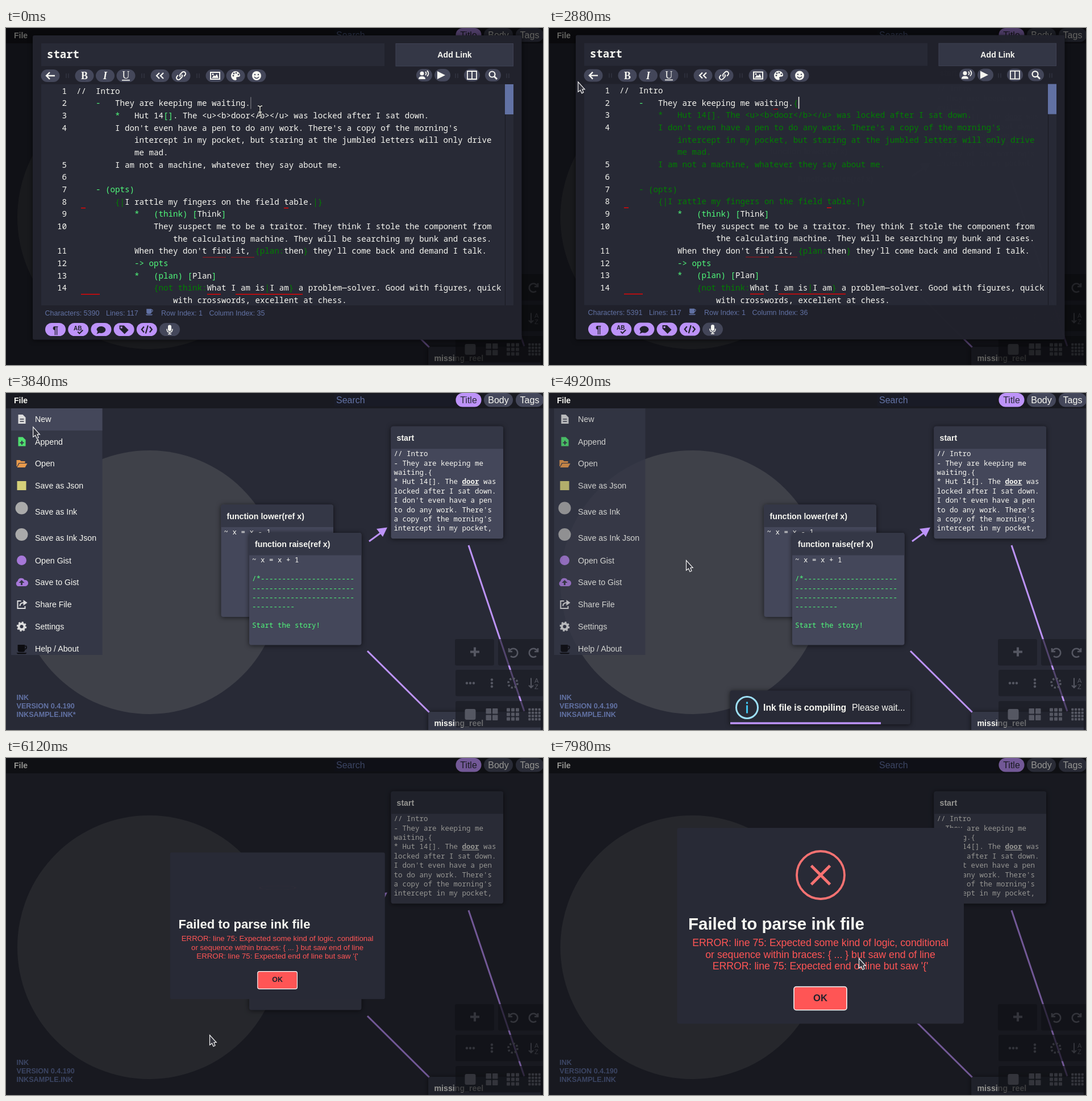
These frames come from a looping animation (945 by 593 pixels, 8000 ms). An HTML page:

```html
<!DOCTYPE html>
<html lang="en">
<head>
<meta charset="utf-8">
<title>Story editor</title>
<style>
html, body { margin: 0; width: 100%; height: 100%; overflow: hidden; background: #282a36; }
svg { display: block; width: 100vw; height: 100vh; }
text { white-space: pre; fill: #f8f8f2; font-family: "Liberation Sans", Arial, sans-serif; }
.mono { font-family: "Noto Sans Mono", monospace; }
.b { font-weight: 700; }
.g { fill: #50fa7b; }
.d, .open text, .open tspan { fill: #008000; }
.shade { filter: drop-shadow(0 1px 4px rgba(0,0,0,.6)); }
</style>
</head>
<body>
<svg id="stage" viewBox="0 0 945 593"></svg>
<script>
const FG = '#f8f8f2', BG = '#282a36', LINE = '#44475a', HEAD = '#343746',
      BLUE = '#6272a4', PURPLE = '#bd93f9', RED = '#ff5555', DARK = '#21222c';
const esc = s => s.replace(/&/g, '&amp;').replace(/</g, '&lt;');
const rect = (x, y, w, h, fill, r = 0, more = '') =>
  `<rect x="${x}" y="${y}" width="${w}" height="${h}" rx="${r}" fill="${fill}" ${more}/>`;
const circle = (x, y, r, fill, more = '') => `<circle cx="${x}" cy="${y}" r="${r}" fill="${fill}" ${more}/>`;
const text = (x, y, size, s, more = '') => `<text x="${x}" y="${y}" font-size="${size}" ${more}>${esc(s)}</text>`;
const fill = (d, c = FG) => `<path d="${d}" fill="${c}" fill-rule="evenodd"/>`;
const line = (d, c = FG, w = 2) => `<path d="${d}" fill="none" stroke="${c}" stroke-width="${w}"/>`;
const at = (x, y, s) => `<g transform="translate(${x} ${y})">${s}</g>`;
const group = (id, s, more = '') => `<g id="${id}" ${more}>${s}</g>`;
const mid = c => `text-anchor="middle" style="fill:${c}"`;
const grid = (n, size, gap, c) => {
  let s = '', o = -(n * size + (n - 1) * gap) / 2;
  for (let i = 0; i < n * n; i++)
    s += rect(o + (i % n) * (size + gap), o + Math.floor(i / n) * (size + gap), size, size, c, n > 1 ? 1 : 3);
  return s;
};
const cup = c => fill('M-6-6H5V2Q5 5 2 5H-3Q-6 5-6 2ZM-8 6H8L6 8H-6Z', c) + line('M5-4H7Q9-1 5 1', c, 1.5);

// ---- board -------------------------------------------------------------
function card(x, y, title, rows) {
  let s = rect(x, y, 197.5, 197.5, LINE, 4) +
    `<path d="M${x} ${y + 39.5}v-35.5q0-4 4-4h189.5q4 0 4 4v35.5z" fill="${HEAD}"/>` +
    text(x + 10, y + 25, 14.2, title, 'class="b"');
  rows.forEach((r, i) => {
    if (r) s += `<text class="mono ${r[0] === '^' ? 'g' : ''}" x="${x + 5}" y="${y + 52.3 + i * 16.4}" font-size="12.5">` +
      esc(r.replace('^', '')).replace('door', '<tspan font-weight="700" text-decoration="underline">door</tspan>') + '</text>';
  });
  return `<g class="shade">${s}</g>`;
}

function tools() {
  const c = '#555762', box = (x, y, w) => rect(x, y, w, 46.5, '#1a1b22', 3, 'opacity=".65"');
  const turn = 'M-7-7V-1H-1M-6-2A7.5 7.5 0 1 1-4 7';
  const dots = v => [-6, 0, 6].map(i => circle(v ? 0 : i, v ? i : 0, 2.2, c)).join('');
  return box(790, 433, 69) + box(866, 433, 90) + box(791, 487, 160) + box(791, 542, 160) +
    at(825, 455.5, line('M-8 0H8M0-8V8', c, 4)) +
    at(892, 456, line(turn, c, 2.6)) + at(929, 456, `<g transform="scale(-1 1)">${line(turn, c, 2.6)}</g>`) +
    at(817, 510.5, dots(0)) + at(855, 510.5, dots(1)) +
    at(892, 510.5, circle(0, 0, 8, 'none', `stroke="${c}" stroke-width="3.6" stroke-dasharray="3.2 3.1"`)) +
    at(929, 510.5, line('M-5-9V8M-9 4L-5 8L-1 4', c, 2) + text(1, -1, 11, 'A', `style="fill:${c}"`) +
      text(1, 10, 11, 'Z', `style="fill:${c}"`)) +
    at(817, 565.5, grid(1, 19, 0, c)) + at(855, 565.5, grid(2, 9.5, 2, c)) +
    at(892, 565.5, grid(3, 6, 2, c)) + at(930, 565.5, grid(4, 4.2, 1.6, c));
}

function board() {
  const pill = (x, w, s, bg, fg) => rect(x, 0, w, 24.5, bg, 12) + text(x + w / 2, 18, 16, s, mid(fg));
  const start = ['// Intro', '- They are keeping me', 'waiting.{', '* Hut 14[]. The door was', 'locked after I sat down.',
    "I don't even have a pen", "to do any work. There's", "a copy of the morning's", 'intercept in my pocket,'];
  const dash = n => '^' + '-'.repeat(n);
  return rect(0, 0, 945, 593, BG) + circle(252, 333, 232, '#3f4149') +
    group('version', ['INK', 'VERSION 0.4.190'].map((s, i) =>
      text(18.5, 540 + i * 15.2, 12.6, s, `class="b" style="fill:${BLUE}"`)).join('') +
      text(18.5, 570.4, 12.6, '', `id="file" class="b" style="fill:${BLUE}"`)) +
    line('M639 261L661 245M636 454L745 562M814 268L912 560', PURPLE, 3) + fill('M671 236.5L663 253L652 239Z', PURPLE) +
    card(378.5, 196.5, 'function lower(ref x)', ['~ x = x - 1']) +
    card(428, 246, 'function raise(ref x)', ['~ x = x + 1', '', '^/*' + '-'.repeat(22), dash(24), dash(24), dash(10), '', '^Start the story!']) +
    card(677.5, 58.8, 'start', start) + card(743.5, 561, 'missing_reel', []) + tools() +
    rect(0, 0, 945, 27, '#191a21') + text(14, 17.5, 14, 'File', 'class="b"') +
    rect(578, 2, 209, 21.5, '#191b26') + text(581, 18, 16, 'Search', `style="fill:${BLUE}"`) +
    pill(791.5, 45, 'Title', PURPLE, BG) + pill(841, 51, 'Body', LINE, FG) + pill(897, 49, 'Tags', LINE, FG);
}

// ---- file menu ---------------------------------------------------------
function menu() {
  const page = 'M-6-8H2L7-3V8H-6Z';
  const items = [
    ['New', 46, fill(page, '#ddd') + line('M-3 0H4M-3 4H4', HEAD, 1.5)],
    ['Append', 85.5, fill(page, '#50e070') + line('M-3 2H4M.5-1.5V5.5', HEAD, 2)],
    ['Open', 124, fill('M-9-6H-3L-1-4H6V-1H-5L-8 5H-9ZM-4 0H10L6 7H-8Z', '#e89a4c')],
    ['Save as Json', 163, rect(-8, -8, 16, 16, '#d5d079')],
    ['Save as Ink', 208.5, at(0, -6, circle(0, 0, 11, '#aaa'))],
    ['Save as Ink Json', 255, at(0, -6, circle(0, 0, 11, '#aaa'))],
    ['Open Gist', 294.5, circle(0, 0, 8.5, '#a678d8')],
    ['Save to Gist', 333, fill('M-7 7A5 5 0 0 1-7-2A6.5 6.5 0 0 1 5-4A5.5 5.5 0 0 1 7 7ZM0-4L-5 1H-1.5V5H1.5V1H5Z', '#a678d8')],
    ['Share File', 372, line('M-1-6H-7V7H6V3M-3 3Q-3-3 4-3', '#ddd', 2) + fill('M3-8L10-3L3 2Z', '#ddd')],
    ['Settings', 411, circle(0, 0, 5, 'none', 'stroke="#ddd" stroke-width="4"') +
      circle(0, 0, 7.5, 'none', 'stroke="#ddd" stroke-width="2.5" stroke-dasharray="3 2.89"')],
    ['Help / About', 450, `<g transform="scale(1.15)">${cup('#0c0c10')}</g>`]];
  return rect(9, 27, 160.5, 434, HEAD) + rect(9, 0, 160.5, 0, LINE, 0, 'id="hover"') +
    items.map(([s, y, icon]) => at(27.5, y, icon) + text(51, y + 5, 14.2, s)).join('');
}

// ---- text editor -------------------------------------------------------
const rowY = k => 115.5 + k * 21.68;
// "^" toggles bright green, "~" toggles dark green
function code(row, col, src) {
  let c = '', s = '';
  for (const part of src.split(/([\^~])/)) {
    if (part === '^' || part === '~') c = c ? '' : part === '^' ? 'g' : 'd';
    else if (part) s += `<tspan class="${c}">${esc(part)}</tspan>`;
  }
  return `<text class="mono" font-size="14.17" x="${124 + col * 8.5}" y="${rowY(row)}">${s}</text>`;
}

function page() {
  const rows = list => list.map(r => code(...r)).join('');
  const nums = [0, 1, 2, 3, 6, 7, 8, 9, 10, 11, 13, 14, 15, 16].map((k, i) =>
    text(107, rowY(k), 14.17, String(i + 1), 'class="mono" text-anchor="end"')).join('');
  const wrong = [[9, 132, 8], [9, 489, 8], [13, 346, 41], [13, 396, 41], [16, 132, 33], [16, 354, 24], [16, 404, 118]];
  return nums + rows([[0, 0, '//  Intro'], [1, 8, 'They are keeping me waiting.']]) +
    group('dash', code(1, 4, '-')) + group('brace', code(1, 36, '{')) +
    group('block', rows([
      [2, 8, '^*^   Hut 14^[]^. The <u><b>door</b></u> was locked after I sat down.'],
      [3, 8, "I don't even have a pen to do any work. There's a copy of the morning's"],
      [4, 12, 'intercept in my pocket, but staring at the jumbled letters will only drive'],
      [5, 12, 'me mad.'], [6, 8, 'I am not a machine, whatever they say about me.'],
      [8, 4, '^- (opts)^'], [9, 8, '~{|~I rattle my fingers on the field table.~|}~']])) +
    rows([[10, 12, '^*   (think) [^Think^]^'],
      [11, 16, 'They suspect me to be a traitor. They think I stole the component from'],
      [12, 20, 'the calculating machine. They will be searching my bunk and cases.'],
      [13, 12, "When they don't find it, ~{plan:~then~}~ they'll come back and demand I talk."],
      [14, 12, '^-> opts^'], [15, 12, '^*   (plan) [^Plan^]^'],
      [16, 16, '~{not think:~What I am is~|~I am~}~ a problem—solver. Good with figures, quick'],
      [17, 20, 'with crosswords, excellent at chess.']]) +
    wrong.map(([k, x, w]) => rect(x, rowY(k) + 5.5, w, 1.3, k === 13 ? '#8c1a22' : '#f00')).join('') +
    group('typo', rect(395, 142.5, 8, 1.2, '#a00')) + rect(0, 121.5, 1.6, 21, FG, 0, 'id="caret"');
}

function editor() {
  const serif = (s, more) => text(0, 6, 18, s, `text-anchor="middle" style="font-family:'Liberation Serif',serif;font-weight:700;${more || ''}"`);
  const face = circle(0, 0, 8, FG) + circle(-3, -2, 1.2, LINE) + circle(3, -2, 1.2, LINE) + line('M-4 2Q0 7 4 2', LINE, 1.5);
  const top = [
    [78, 84, line('M8 0H-7M-1-6L-7 0L-1 6', FG, 2.4)], [138, 84, serif('B')], [174.5, 84, serif('I', 'font-style:italic')],
    [211, 84, at(0, -1, serif('U', 'font-weight:400')) + rect(-7, 7, 14, 1.6, FG)],
    [271, 84, line('M-1-5L-6 0L-1 5M6-5L1 0L6 5', FG, 2.2)],
    [308, 84, line('M-1 2A3.5 3.5 0 0 1-1-3L2-6A3.5 3.5 0 0 1 7-1L5 1M1-2A3.5 3.5 0 0 1 1 3L-2 6A3.5 3.5 0 0 1-7 1L-5-1', FG, 2)],
    [368, 84, fill('M-9-7H9V7H-9ZM-7-5V5H7V-5ZM-6 4L-2-1L0 1L3-3L6 4Z') + circle(-4, -2.5, 1.5, FG)],
    [404, 84, fill('M0-8A8 8 0 0 0 0 8Q3 7 1 4Q1 2 5 2Q8 2 8-1A8 8 0 0 0 0-8Z') +
      [[-4, 0], [-3, -4], [1, -5], [5, -2]].map(p => circle(...p, 1.4, LINE)).join('')],
    [441, 84, face], [736, 83, circle(-4, -3, 3.5, FG) + fill('M-10 7Q-10 2-4 2Q2 2 2 7Z') + line('M2-6Q5-3 2 0M5-8Q10-3 5 2', FG, 1.8)],
    [768, 83, fill('M-9-7L5 0L-9 7Z')], [820, 83, line('M-8-7H8V7H-8ZM0-7V7', FG, 1.8)],
    [857, 83, circle(-1.5, -1.5, 5, 'none', `stroke="${FG}" stroke-width="2.2"`) + line('M2 2L7 7', FG, 2.8)]];
  const low = [
    text(0, 7, 18, '¶', `class="b" ${mid(DARK)}`),
    text(-1, 1, 10, 'AB', `class="b" ${mid(DARK)}`) + line('M-1 4L2 7L8 1', DARK, 2),
    fill('M-8 0A8 6 0 1 1-3 6L-8 8L-6 4Z', DARK),
    fill('M-8-7H0L8 1L1 8L-8-1ZM-6-5V-2H-3V-5Z', DARK),
    line('M-5-5L-9 0L-5 5M5-5L9 0L5 5M2-7L-2 7', DARK, 2.2),
    rect(-3, -8, 6, 11, FG, 3) + line('M-5-1Q-5 5 0 5Q5 5 5-1M0 5V8M-3 8H3', FG, 1.5)];
  const stat = (x, s, id = '') => text(x, 505.5, 12.5, s, `${id && `id="${id}"`} style="fill:${BLUE}"`);
  return rect(47, 13, 860.5, 535.5, DARK, 3, 'class="shade"') + rect(62, 27, 604, 40, BG) +
    text(72, 52.5, 19, 'start', 'class="mono b"') +
    rect(686, 27.5, 206.5, 39.5, HEAD, 0, 'stroke="#3f4254"') + text(789.5, 52.2, 14.1, 'Add Link', `class="b" ${mid(FG)}`) +
    top.map(([x, y, s]) => {
      const w = x > 700 ? 28 : 33;
      return rect((x === 768 ? 768 : x) - w / 2, y - 11, w, 22, LINE, 11) + at(x, y, s);
    }).join('') +
    [108, 241, 338, 793, 883].map(x => line(`M${x - 2} 80V88M${x + 2} 80V88`, '#3a3c4b', 1)).join('') +
    rect(62, 99, 831, 389, BG) + `<clipPath id="view">${rect(62, 99, 816, 389, FG)}</clipPath><g clip-path="url(#view)">${page()}</g>` +
    rect(878, 99, 15, 389, BG) + rect(878, 99, 1, 389, '#191a21') + rect(878, 99, 15, 53, BLUE) +
    stat(68.5, '', 'chars') + stat(176, 'Lines: 117') + at(252, 499, `<g transform="scale(.8)">${cup(BLUE)}</g>`) +
    stat(273, 'Row Index: 1') + stat(357.5, '', 'column') +
    low.map((s, i) => at(87 + i * 40.2, 530.5, rect(-18, -11.5, 36, 23, i < 5 ? PURPLE : LINE, 11.5) + s)).join('');
}

// ---- messages ----------------------------------------------------------
const toast = () => rect(318.5, 523.5, 317.5, 59.5, BG, 4, 'class="shade"') +
  circle(348.5, 553.5, 19, 'none', 'stroke="#9de0f6" stroke-width="3"') + rect(347, 549.5, 3, 14, '#3fc3ee') + rect(347, 543.5, 3, 3.5, '#3fc3ee') +
  text(377, 558.7, 15.75, 'Ink file is compiling', 'class="b"') + text(533, 558.7, 15.75, 'Please wait...') +
  rect(319, 579.3, 0, 3.5, PURPLE, 0, 'id="bar"');

const dialog = () => rect(225.5, 123, 504.5, 344.5, BG, 4) +
  group('icon', circle(0, 0, 42, 'none', 'stroke="#f87272" stroke-width="3.8"') +
    group('cross', line('M-16.5-16.5L16.5 16.5M16.5-16.5L-16.5 16.5', '#f87272', 5))) +
  text(245, 301.5, 29.5, 'Failed to parse ink file', 'class="b"') +
  ['ERROR: line 75: Expected some kind of logic, conditional', 'or sequence within braces: { ... } but saw end of line',
    "ERROR: line 75: Expected end of line but saw '{'"].map((s, i) => text(477.5, 331 + i * 20.7, 17.72, s, mid(RED))).join('') +
  rect(431, 402.5, 93, 41, RED, 4, 'stroke="#fff" stroke-width="1.5"') + text(477.5, 427.5, 16.6, 'OK', `class="b" ${mid(DARK)}`);

const BEAM = 'M-4-9Q0-9 0-6V6Q0 9-4 9M4-9Q0-9 0-6M0 6Q0 9 4 9M-3 2H3';
const $ = id => document.getElementById(id);
$('stage').innerHTML = board() + group('menu', menu()) + rect(0, 0, 945, 593, '#000', 0, 'id="dim"') +
  group('editor', editor()) + group('toast', toast()) + group('dialog', dialog()) +
  group('mouse', group('beam', line(BEAM, '#111', 3) + line(BEAM, FG, 1.3)) +
    group('arrow', '<path d="M.5.5V18L4.5 15L7 20.5L10 19L8 13.5H12.2Z" fill="#35363f" stroke="#f2f2f2" stroke-width="1.2"/>'));

// ---- motion ------------------------------------------------------------
const clamp = v => Math.min(1, Math.max(0, v));
const ramp = (t, a, b) => clamp((t - a) / (b - a));
const mix = (a, b, p) => a + (b - a) * p;
const smooth = p => p * p * (3 - 2 * p);
const path = [[0, 447, 146], [60, 447, 146], [360, 450, 129], [1799, 450, 129], [1800, 465, 141], [1950, 465, 141],
  [2300, 320, 190], [2760, 75, 102], [3000, 27, 87], [3140, 27, 87], [3440, 25, 11], [3630, 25, 11], [4380, 140, 262],
  [4919, 140, 262], [4920, 241, 294], [5080, 241, 294], [5860, 358, 487], [6140, 358, 487], [6720, 310, 332], [6750, 310, 332],
  [7170, 648, 331], [7560, 308, 350], [7660, 308, 350], [7980, 545, 352]];

function track(t) {
  const i = path.findIndex(k => k[0] > t);
  if (i < 0) return path[path.length - 1].slice(1);
  const [a, b] = [path[i - 1], path[i]], p = smooth(ramp(t, a[0], b[0]));
  return [mix(a[1], b[1], p), mix(a[2], b[2], p)];
}
function keys(p, list) {
  const i = Math.max(1, list.findIndex(k => k[0] >= p)), [a, b] = [list[i - 1], list[i]];
  return mix(a[1], b[1], ramp(p, a[0], b[0]));
}
const set = (id, o) => { for (const k in o) $(id).setAttribute(k, o[k]); };
const show = (id, v) => set(id, { opacity: +v, visibility: +v > 0 ? 'visible' : 'hidden' });

function draw(t) {
  const typed = t >= 1140, parsed = t >= 1800, gone = ramp(t, 2880, 3126);
  show('editor', 1 - gone);
  set('editor', { transform: `translate(0 ${-100 * gone})` });
  show('brace', typed);
  show('typo', parsed);
  $('block').setAttribute('class', parsed ? 'open' : '');
  $('brace').setAttribute('class', parsed ? 'open' : '');
  $('dash').querySelector('tspan').setAttribute('class', typed && !parsed ? '' : 'g');
  $('chars').textContent = 'Characters: ' + (typed ? 5391 : 5390);
  $('column').textContent = 'Column Index: ' + (typed ? 36 : 35);
  set('caret', { x: typed ? 438.8 : 430 });
  show('caret', gone < 1 ? (t < 60 ? .3 : t < 720 ? 0 : t < 960 ? .5 : 1 - gone) : 0);
  show('version', gone);
  $('file').textContent = 'INKSAMPLE.INK' + (t < 4620 ? '*' : '');

  const [x, y] = track(t);
  const tops = [27, 66, 105, 144, 183, 232, 275], row = tops.findIndex(v => v > y);
  const hover = row > 0 && t > 3500 && t < 4620;
  show('menu', t < 3500 ? 0 : t < 4620 ? 1 : t < 5100 ? .8 : .8 * (1 - ramp(t, 5100, 5340)));
  show('hover', hover);
  if (hover) set('hover', { y: tops[row - 1], height: tops[row] - tops[row - 1] });

  show('toast', t >= 4620 && t < 5950);
  const held = t < 4920 ? 4620 : t < 5100 ? 4920 : t;
  set('bar', { width: Math.max(0, 317 - (held - 4400) * .1) });

  show('dim', gone < 1 ? .6 * (1 - gone) : .4 * ramp(t, 5980, 6080));
  const pop = ramp(t, 6102, 6402), scale = keys(pop, [[0, .7], [.45, 1.05], [.8, .95], [1, 1]]);
  show('dialog', t >= 6102);
  set('dialog', { transform: `translate(478 295.3) scale(${scale}) translate(-478 -295.3)` });
  const p = ramp(t, 6102, 6602), tilt = Math.cos((1 - p) * 100 * Math.PI / 180);
  set('icon', { transform: `translate(478 206) scale(1 ${tilt})`, opacity: p });
  const drop = keys(p, [[0, 26], [.5, 26], [.8, -6], [1, 0]]), grow = keys(p, [[0, .4], [.5, .4], [.8, 1.15], [1, 1]]);
  set('cross', { transform: `translate(0 ${drop}) scale(${grow})`, opacity: ramp(p, .5, 1) });

  const beam = t < 2880 && x > 120;
  show('beam', beam);
  show('arrow', !beam);
  set('mouse', { transform: `translate(${x} ${y})` });
}

const began = performance.now();
(function tick() {
  draw((performance.now() - began) % 8000);
  requestAnimationFrame(tick);
})();
</script>
</body>
</html>
```
